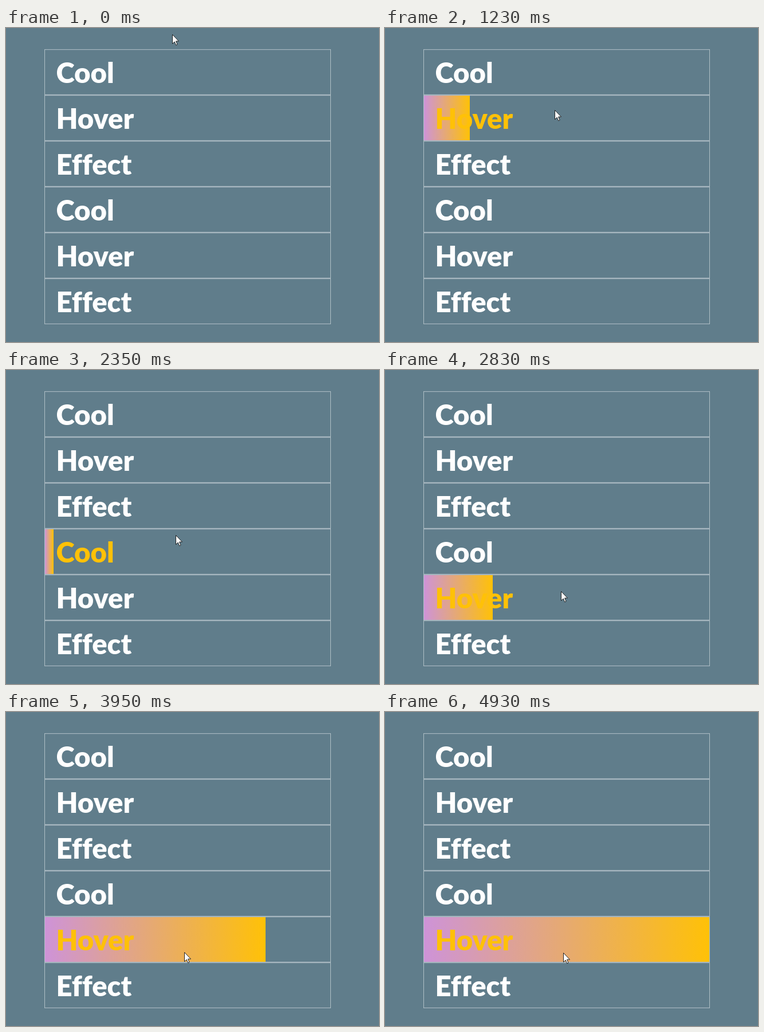
Recreate the animation shown at these times as an HTML page. Size 651 by 548 pixels, loop 5330 ms.

```html
<!DOCTYPE html>
<html lang="en">
<head>
<meta charset="utf-8">
<title>Hover menu</title>
<style>
  html, body { margin: 0; width: 100%; height: 100%; overflow: hidden; background: #607d8b; }
  ul { position: absolute; left: 67px; top: 37px; margin: 0; padding: 0; list-style: none; }
  li {
    position: relative; box-sizing: border-box; width: 500px; height: 80px; padding-left: 19.5px;
    border: 1px solid #a6b6bf; border-left-color: #b0c0c6; border-right-color: #b0c0c6;
    box-shadow: inset 0 1px #b0bec52b, inset 0 -1px #b0bec52b;
    font: 900 49px/78px Lato, sans-serif; font-variant-ligatures: none; color: #fff;
  }
  li.on { color: #ffc107; }
  li:not(.on) i { display: none; }
  i {
    position: absolute; left: 0; top: 0; height: 100%;
    background: linear-gradient(90deg, #ce93d8, #ffc107);
    animation: fill 500ms ease both paused;
  }
  @keyframes fill { from { width: 0; } to { width: 100%; } }
  span { position: relative; }
  svg { position: absolute; left: 0; top: 0; overflow: visible; }
</style>
</head>
<body>
<ul></ul>
<svg width="12" height="20"><path d="M.5 .5V16.5L4.2 13 6.6 18.8 9 17.8 6.6 12H11.5Z" fill="#fff" stroke="#111" stroke-width=".9"/></svg>
<script>
const LOOP = 5330, STEP = 69.6, PHASE = 1020, FILL_MS = 500;
const TOP = 37, ROW = 80, START_Y = 11;

// Pointer moves: [start, duration, y reached]. It visits each row, then wavers over the last edge.
const moves = [
  [330, 100, 66], [1018, 240, 146], [1600, 240, 226], [2177, 240, 306], [2600, 240, 386],
  [3300, 200, 460], [3600, 200, 419], [4050, 100, 452], [4150, 100, 407],
  [4300, 70, 450], [4370, 80, 420]
];

const list = document.querySelector('ul');
const pointer = document.querySelector('svg');
const rows = ['Cool', 'Hover', 'Effect', 'Cool', 'Hover', 'Effect'].map(word => {
  const row = document.createElement('li');
  row.innerHTML = `<i></i><span>${word}</span>`;
  list.append(row);
  return row;
});

function smooth(p) {
  const u = Math.min(1, Math.max(0, p));
  return u * u * (3 - 2 * u);
}

const pointerY = t => moves.reduce(
  (y, [start, duration, to]) => y + (to - y) * smooth((t - start) / duration), START_Y);

// The pointer drifts right as it goes down.
const pointerX = y => 290 + Math.min(6, (y - START_Y) / 15) + Math.max(0, (y - 287) / 9);

const rowAt = t => Math.floor((pointerY(t) - TOP) / ROW);

// How long the pointer has been on its row, up to a full fill.
function hoverAge(t) {
  const row = rowAt(t);
  let age = 0;
  while (age < FILL_MS && rowAt(t - age) === row) age++;
  return age;
}

function draw(clock) {
  const t = PHASE + STEP * Math.floor((clock - PHASE) / STEP);
  const active = rowAt(t), age = hoverAge(t);
  rows.forEach((row, k) => {
    row.classList.toggle('on', k === active);
    row.firstChild.style.animationDelay = `${-age}ms`;
  });
  const y = pointerY(t);
  pointer.style.transform = `translate(${Math.round(pointerX(y))}px, ${Math.round(y)}px)`;
}

const origin = performance.now();
function tick() {
  draw((performance.now() - origin) % LOOP);
  requestAnimationFrame(tick);
}
tick();
</script>
</body>
</html>
```
